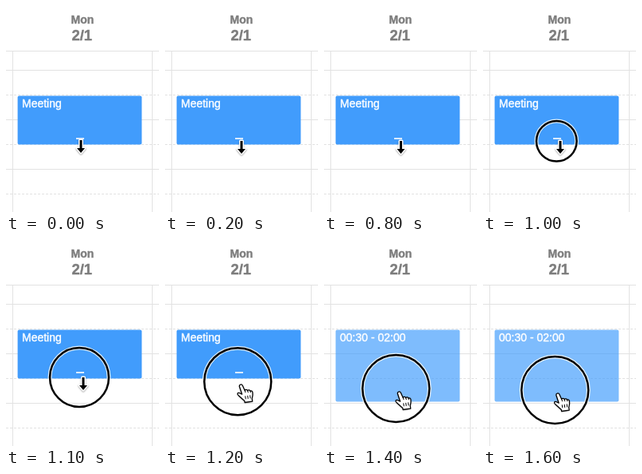
These frames come from a looping animation (192x258 px, 1.7 s). An HTML page with a canvas:

```html
<!DOCTYPE html>
<html lang="en">
<head>
<meta charset="utf-8">
<title>Resizing a calendar event</title>
<style>
  html, body { margin: 0; width: 100%; height: 100%; overflow: hidden; background: #fff; }
  canvas { display: block; width: 192px; height: 258px; }
</style>
</head>
<body>
<canvas id="stage" width="192" height="258"></canvas>
<script>
const ctx = document.getElementById('stage').getContext('2d');
const LOOP = 1700, STEP = 100;
const FONT = '"Liberation Sans", Arial, sans-serif';

// Cursor keys: time, shape, x and y of its hot spot.
const cursorKeys = [
  [0, 'arrow', 94, 176], [100, 'arrow', 95, 177], [200, 'arrow', 96, 177],
  [400, 'hand', 93, 168], [500, 'hand', 93, 168], [600, 'arrow', 96, 176],
  [800, 'arrow', 96.5, 177], [1000, 'arrow', 97, 177], [1100, 'arrow', 97, 180],
  [1200, 'hand', 95, 181], [1300, 'hand', 94, 188], [1400, 'hand', 94, 190],
  [1500, 'hand', 93.5, 191], [1600, 'hand', 93.5, 192]
];

// Press ring keys: time, x, y, radius.
const ringKeys = [
  [900, 92, 169, 10], [1000, 92.3, 169.2, 25.3], [1100, 92, 172, 37],
  [1200, 91.3, 177.2, 42], [1300, 90.3, 183.7, 42], [1400, 90.3, 186, 42],
  [1500, 90.3, 187, 42], [1600, 90.3, 188, 42]
];

const keyAt = (keys, time) => keys.filter(key => key[0] <= time).pop();

// The thin stroke gives the slightly heavier glyphs of the scene.
function text(label, x, y, font, color, align = 'left') {
  ctx.font = `${font} ${FONT}`;
  ctx.fillStyle = ctx.strokeStyle = color;
  ctx.lineWidth = 0.4;
  ctx.textAlign = align;
  ctx.fillText(label, x, y);
  ctx.strokeText(label, x, y);
}

function line(x1, y1, x2, y2, dash = []) {
  ctx.setLineDash(dash);
  ctx.beginPath();
  ctx.moveTo(x1, y1);
  ctx.lineTo(x2, y2);
  ctx.stroke();
  ctx.setLineDash([]);
}

function drawGrid() {
  ctx.fillStyle = '#fff';
  ctx.fillRect(0, 0, 192, 258);
  ctx.strokeStyle = '#e2e2e2';
  ctx.lineWidth = 1;
  line(0, 56.5, 192, 56.5);
  line(8.5, 57, 8.5, 258);
  line(183.5, 57, 183.5, 258);
  for (let i = 0; i < 6; i++) {
    const y = 80.5 + i * 31;
    line(0, y, 192, y, i % 2 ? [3, 2] : []);
  }
  text('Mon', 96, 22, 'bold 14px', '#7d7d7d', 'center');
  text('2/1', 95.3, 43, 'bold 18.5px', '#7d7d7d', 'center');
}

function drawEvent(resizing) {
  ctx.globalAlpha = resizing ? 0.68 : 1;
  ctx.fillStyle = '#419cfc';
  ctx.beginPath();
  ctx.roundRect(14.6, 112.6, 155.8, resizing ? 89.8 : 60.8, 2);
  ctx.fill();
  ctx.globalAlpha = 1;
  text(resizing ? '00:30 - 02:00' : 'Meeting', 20, 127, '14px', '#fff');
  if (!resizing) {
    ctx.fillStyle = '#d9ebfe';
    ctx.fillRect(88, 165, 10, 2);
  }
}

function drawRing(x, y, radius) {
  ctx.beginPath();
  ctx.arc(x, y, radius, 0, Math.PI * 2);
  ctx.strokeStyle = 'rgba(255, 255, 255, .8)';
  ctx.lineWidth = 5;
  ctx.stroke();
  ctx.strokeStyle = '#000';
  ctx.lineWidth = 2.5;
  ctx.stroke();
}

const arrow = new Path2D('M-1.5-8H1.5V2H5L0 8L-5 2H-1.5Z');
const hand = new Path2D(
  'M-2 2C-2-.5 1.5-.8 2.2 1.8L4 8.2C5 6.8 7 7.3 7.4 8.9C8.6 7.8 10.3 8.5 10.6 10' +
  'C12 9.2 13.3 10.3 13.3 12C13.3 16 12.6 17 11.4 19.4V23H1.7V21' +
  'C-.8 18.5-2.2 16-4.5 13.4C-7 10.9-5.2 9-2.9 10.4L-.2 12.3Z');
const knuckles = new Path2D('M4 8L4.5 11M7.4 9L7.8 11.5M10.6 10L10.8 12M3.5 15V19M6.5 15V19M9.5 15V19');

function castShadow() {
  ctx.shadowColor = 'rgba(0, 0, 0, .35)';
  ctx.shadowBlur = 2;
  ctx.shadowOffsetY = 1;
}

function drawCursor(shape, x, y) {
  ctx.save();
  ctx.translate(x, y);
  ctx.lineJoin = 'round';
  castShadow();
  if (shape === 'arrow') {
    ctx.strokeStyle = '#fff';
    ctx.lineWidth = 3;
    ctx.stroke(arrow);
    ctx.shadowColor = 'transparent';
    ctx.fillStyle = '#000';
    ctx.fill(arrow);
  } else {
    ctx.rotate(-0.15);
    ctx.fillStyle = '#fff';
    ctx.fill(hand);
    ctx.shadowColor = 'transparent';
    ctx.strokeStyle = '#000';
    ctx.lineWidth = 1.3;
    ctx.stroke(hand);
    ctx.lineWidth = 1;
    ctx.stroke(knuckles);
  }
  ctx.restore();
}

function render(now) {
  const time = Math.floor((now % LOOP) / STEP) * STEP;
  const [, shape, x, y] = keyAt(cursorKeys, time);
  const ring = keyAt(ringKeys, time);
  drawGrid();
  drawEvent(time >= 1300);
  if (ring) drawRing(...ring.slice(1));
  drawCursor(shape, x, y);
}

const start = performance.now();
function tick() {
  render(performance.now() - start);
  requestAnimationFrame(tick);
}
tick();
</script>
</body>
</html>
```
